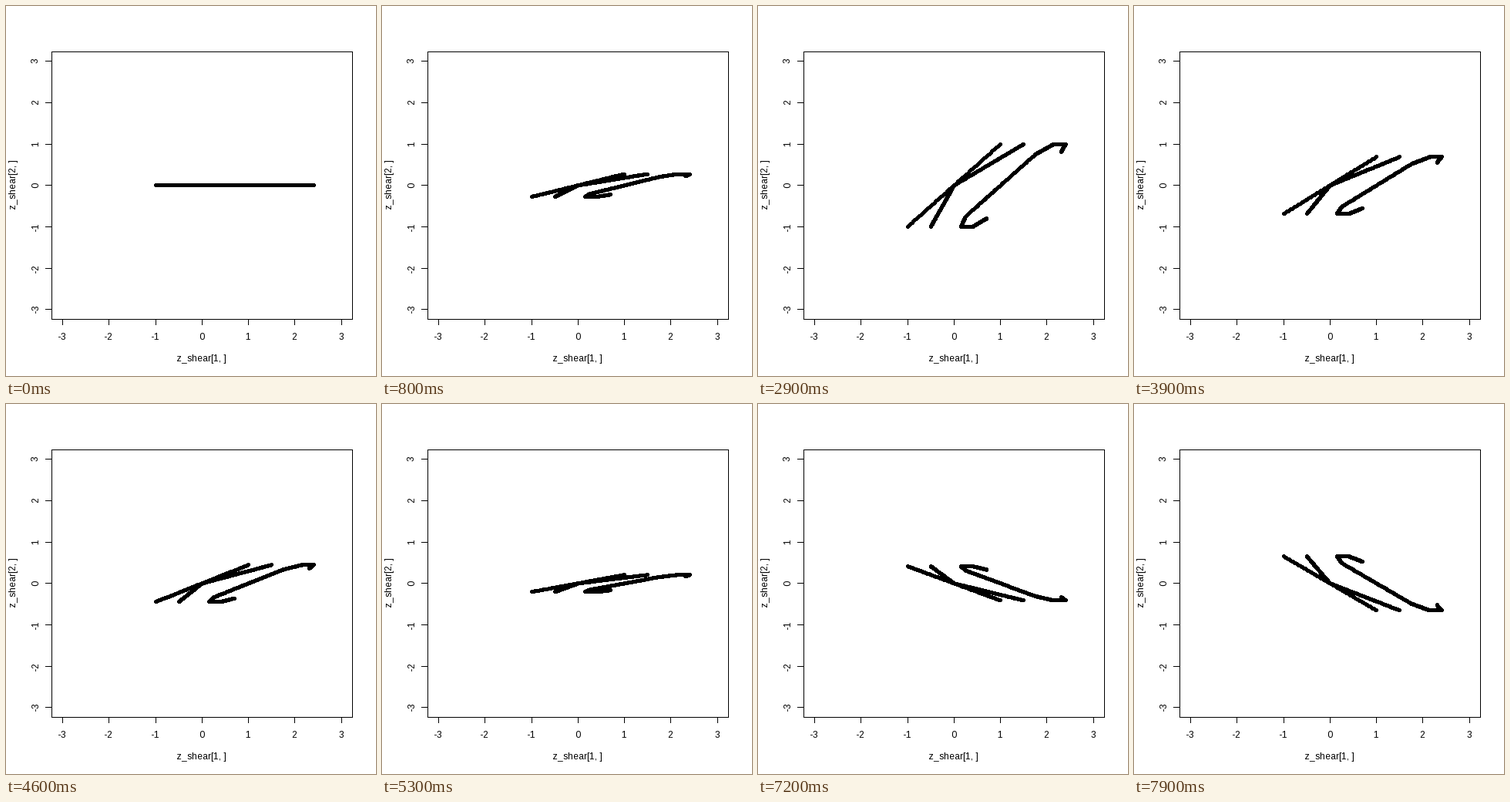
A matplotlib script that plays this animation: 480 px wide and 480 px high, repeating every 8 s.

```python
import numpy as np
import matplotlib.pyplot as plt
from matplotlib.animation import FuncAnimation

SIZE, DPI = 480, 72
FRAMES, STEP_MS = 80, 100
SWEEP = 30  # frames per quarter cycle

LEFT, RIGHT, TOP, BOTTOM = 59.04, 449.76, 59.04, 406.56
CX, CY = (LEFT + RIGHT) / 2, (TOP + BOTTOM) / 2
SX, SY = (RIGHT - LEFT) / 6.48, (BOTTOM - TOP) / 6.48

plt.rcParams.update({
    "font.family": "Liberation Sans",
    "font.size": 12,
    "text.hinting": "force_autohint",
    "text.hinting_factor": 1,
})

# Upright letters K and C, before the shear
STROKES = [
    [(0, -1), (0, 1)],
    [(0.5, 1), (0, 0), (0.5, -1)],
    [(1.5, 0.8), (1.4, 1), (1.15, 1), (1, 0.75),
     (1, -0.75), (1.15, -1), (1.4, -1), (1.5, -0.8)],
]


def sample(stroke, n=100):
    parts = []
    for a, b in zip(stroke, stroke[1:]):
        t = np.linspace(0, 1, n)[:, None]
        parts.append(np.array(a) * (1 - t) + np.array(b) * t)
    return np.vstack(parts)


points = np.vstack([sample(s) for s in STROKES])
points[:, 0] += points[:, 1]  # shear

# Five-pixel dot with its corners cut
DOT = [(dx, dy) for dx in range(-2, 3) for dy in range(-2, 3)
       if abs(dx) + abs(dy) < 4]


def px(x):
    return int(CX + x * SX)


def py(y):
    return int(CY - y * SY)


def rule(img, x0, y0, x1, y1):
    img[y0:y1 + 1, x0:x1 + 1] = 0


def axes_canvas():
    img = np.full((SIZE, SIZE), 255, dtype=np.uint8)
    l, r, t, b = int(LEFT), int(RIGHT), int(TOP), int(BOTTOM)
    for edge in [(l, t, r, t), (l, b, r, b), (l, t, l, b), (r, t, r, b)]:
        rule(img, *edge)
    for v in range(-3, 4):
        rule(img, px(v), b, px(v), b + 7)
        rule(img, l - 8, py(v), l, py(v))
    return img


canvas = axes_canvas()


def height(i):
    quarter, k = divmod(i, SWEEP)
    level = k / (SWEEP - 1)
    return (level, 1 - level, -level, level - 1)[quarter % 4]


def draw(i):
    img = canvas.copy()
    xs = (CX + points[:, 0] * SX).astype(int)
    ys = (CY - points[:, 1] * height(i) * SY).astype(int)
    for dx, dy in DOT:
        img[ys + dy, xs + dx] = 0
    return img


fig = plt.figure(figsize=(SIZE / DPI, SIZE / DPI), dpi=DPI, facecolor="white")
ax = fig.add_axes([0, 0, 1, 1])
ax.axis("off")
image = ax.imshow(draw(0), cmap="gray", vmin=0, vmax=255, aspect="auto",
                  interpolation="nearest", extent=(0, SIZE, SIZE, 0))
ax.set(xlim=(0, SIZE), ylim=(SIZE, 0))


def label(x, y, text, angle=0):
    ax.text(x, y, text, color="black", rotation=angle,
            rotation_mode="anchor", ha="center", va="baseline")


for v in range(-3, 4):
    label(px(v) - 0.5, 433, str(v))
    label(42, py(v), str(v), 90)

label(px(0) - 0.5, 461, "z_shear[1, ]")
label(13, py(0), "z_shear[2, ]", 90)


def update(i):
    image.set_data(draw(i))
    return [image]


anim = FuncAnimation(fig, update, frames=FRAMES, interval=STEP_MS,
                     repeat=True, repeat_delay=0)
plt.show()
```
